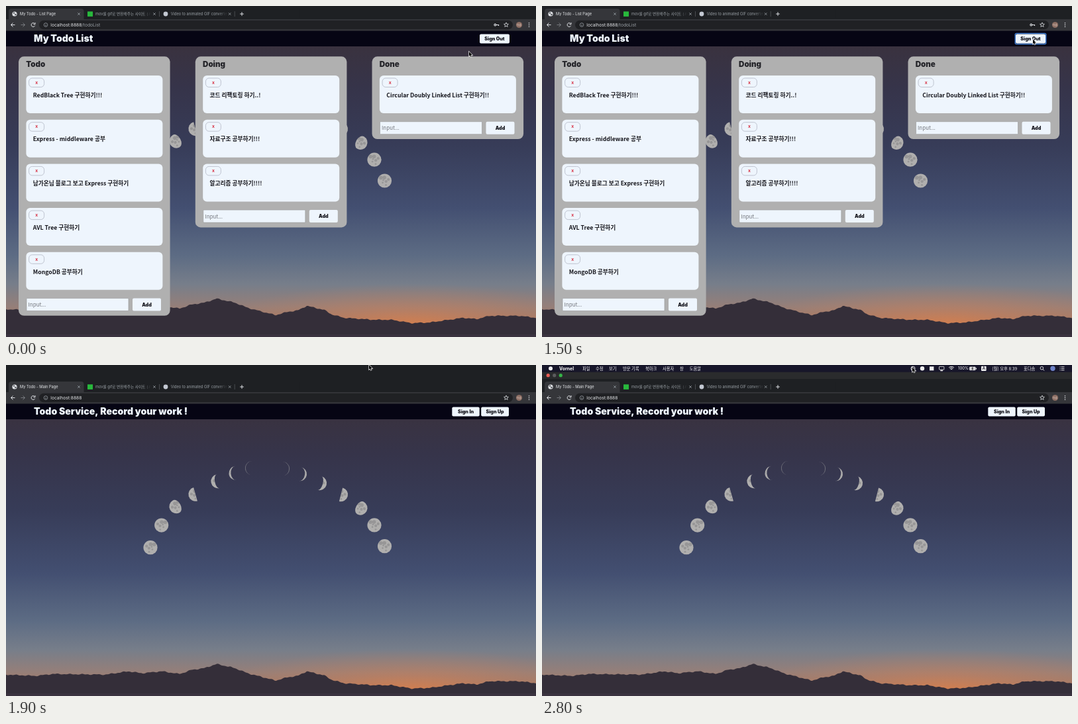
Animation of 800x500 px, one loop 2900 ms. Source, as an HTML page with a canvas:

```html
<!DOCTYPE html>
<html lang="ko">
<head>
<meta charset="utf-8">
<title>My Todo</title>
<style>
html, body { margin: 0; width: 100%; height: 100%; overflow: hidden; background: #1e2023; }
canvas { display: block; }
</style>
</head>
<body>
<canvas id="stage" width="800" height="500"></canvas>
<script>
const ctx = document.getElementById('stage').getContext('2d');
const LOOP = 2900, STEP = 100;
const PAGE_AT = 1600, SHIFT_AT = 1900, MENU_AT = 2000, FOCUS_AT = 1400;
const UI = 'Inter, "Noto Sans CJK KR", sans-serif';
const HAND = '"Noto Sans CJK KR", "Noto Sans CJK", sans-serif';
const PALE = '#eef5fd', ICON = '#dfe1e5', MUTED = '#9aa0a6';

const columns = [
  { x: 19, name: 'Todo', cards: ['RedBlack Tree 구현하기!!!', 'Express - middleware 공부',
    '남가온님 블로그 보고 Express 구현하기', 'AVL Tree 구현하기', 'MongoDB 공부하기'] },
  { x: 285.8, name: 'Doing', cards: ['코드 리팩토링 하기..!', '자료구조 공부하기!!!', '알고리즘 공부하기!!!!'] },
  { x: 552.5, name: 'Done', cards: ['Circular Doubly Linked List 구현하기!!'] }
];

// x, y, phase (1 full, 0 half, -1 new), tilt, opacity; lit on the left for the first half
const moons = [
  [218, 266, 1, 0, 1], [234.7, 232.4, 1, 0, 1], [257, 204, .65, -.5, 1], [286, 185.5, 0, -.28, 1],
  [320, 166, -.45, -.2, 1], [347, 153.7, -.72, -.1, .95], [371.5, 146, -.91, 0, .45],
  [571.5, 264, 1, 0, 1], [556, 232.2, 1, 0, 1], [535, 206.3, .65, .5, 1], [505.5, 186, 0, .25, 1],
  [473.5, 168.8, -.45, .28, 1], [443.5, 155, -.72, .15, .95], [417.5, 147, -.91, 0, .5]
];

const ridge = [[0, 458], [45, 460], [70, 457], [150, 458], [185, 453], [205, 456], [235, 453], [262, 457],
  [280, 451], [300, 448], [318, 442], [345, 448], [365, 456], [407, 467], [425, 462], [440, 460], [454, 453],
  [480, 459], [492, 466], [510, 471], [555, 474], [582, 474], [612, 479], [640, 478], [690, 471], [710, 473],
  [730, 468], [775, 468], [800, 471]];

// time, x, y of the pointer tip
const pointerPath = [[0, 699, 69], [300, 699, 69], [1000, 742, 53], [1300, 742, 53], [1500, 741, 50.5],
  [1600, 744, 52.5], [1800, 590, 1], [1900, 548, 0], [2100, 620, 0], [2300, 612, 3], [2700, 559, 3.5], [2900, 559, 3.5]];

function rect(x, y, w, h, fill, r = 0, stroke, line = 1) {
  ctx.beginPath();
  ctx.roundRect(x, y, w, h, r);
  if (fill) { ctx.fillStyle = fill; ctx.fill(); }
  if (stroke) { ctx.strokeStyle = stroke; ctx.lineWidth = line; ctx.stroke(); }
}

function dot(x, y, r, fill) {
  ctx.beginPath();
  ctx.arc(x, y, r, 0, 7);
  ctx.fillStyle = fill;
  ctx.fill();
}

function ring(x, y, r, color, from = 0, to = 7, width = 1) {
  ctx.beginPath();
  ctx.arc(x, y, r, from, to);
  ctx.strokeStyle = color;
  ctx.lineWidth = width;
  ctx.stroke();
}

function line(color, width, ...points) {
  ctx.beginPath();
  points.forEach(([x, y]) => ctx.lineTo(x, y));
  ctx.strokeStyle = color;
  ctx.lineWidth = width;
  ctx.stroke();
}

// y is the middle of the capitals
function text(s, x, y, size, color, weight = 400, family = UI, align = 'left') {
  ctx.font = `${weight} ${size}px ${family}`;
  ctx.textAlign = align;
  ctx.fillStyle = color;
  ctx.fillText(s, x, y + size * .36);
}

function button(label, x, y, w, h) {
  rect(x, y, w, h, PALE, 2);
  text(label, x + w / 2, y + h / 2, 7.1, '#15151c', 900, UI, 'center');
}

function gradient(g, stops) {
  stops.forEach(([at, color]) => g.addColorStop(at, color));
  return g;
}

function moon([x, y, phase, tilt, alpha], lit) {
  const r = 10.6;
  ctx.save();
  ctx.translate(x, y);
  ctx.rotate(tilt);
  ctx.scale(lit, 1);
  ctx.globalAlpha = alpha;
  ctx.beginPath();
  ctx.arc(0, 0, r, Math.PI / 2, Math.PI * 1.5);
  ctx.ellipse(0, 0, r * Math.abs(phase), r, 0, -Math.PI / 2, Math.PI / 2, phase < 0);
  ctx.fillStyle = '#b0afae';
  ctx.fill();
  ctx.clip();
  for (let i = 0; i < 7; i++) {
    const a = i * 2.4, d = 2 + i * .95;
    dot(Math.cos(a) * d, Math.sin(a) * d - 1, 1.4 + i % 3 * .7, 'rgba(112,112,116,.4)');
  }
  ctx.restore();
}

function scenery(top, shift) {
  ctx.save();
  ctx.beginPath();
  ctx.rect(0, top, 800, 500 - top);
  ctx.clip();
  ctx.translate(0, shift);
  ctx.fillStyle = gradient(ctx.createLinearGradient(0, 55, 0, 485), [[0, '#3a323e'], [.16, '#36344a'],
    [.36, '#373c58'], [.58, '#434f71'], [.75, '#5d6c84'], [.85, '#777e8a'], [.93, '#967f78'], [1, '#a9775e']]);
  ctx.fillRect(0, 40, 800, 460);
  ctx.save();
  ctx.translate(610, 485);
  ctx.scale(1, .22);
  ctx.fillStyle = gradient(ctx.createRadialGradient(0, 0, 0, 0, 0, 300),
    [[0, 'rgba(224,128,72,.85)'], [.4, 'rgba(205,128,88,.5)'], [1, 'rgba(190,130,100,0)']]);
  ctx.fillRect(-610, -320, 800, 400);
  ctx.restore();

  moons.forEach((m, i) => moon(m, i < 7 ? 1 : -1));

  ctx.beginPath();
  ctx.moveTo(0, 510);
  let k = 0;
  for (let x = 0; x <= 800; x += 2) {
    while (k < ridge.length - 2 && x > ridge[k + 1][0]) k++;
    const [x0, y0] = ridge[k], [x1, y1] = ridge[k + 1];
    const rough = Math.sin(x * .7) * .4 + Math.sin(x * .31) * .5;
    ctx.lineTo(x, y0 + (y1 - y0) * (x - x0) / (x1 - x0) + rough);
  }
  ctx.lineTo(800, 510);
  ctx.fillStyle = '#342e39';
  ctx.fill();
  ctx.restore();
  rect(0, 496, 800, 4, '#3a323f');
}

function column({ x, name, cards }) {
  const inputY = 105 + 66.7 * cards.length + 3;
  rect(x, 76.3, 228.6, inputY - 50, '#b0b0b0', 8);
  text(name, x + 11.2, 88, 11.6, '#25252a', 900);
  cards.forEach((label, i) => {
    const y = 105 + 66.7 * i;
    rect(x + 11.4, y, 206, 57, PALE, 6);
    rect(x + 15.6, y + 4, 23, 13.5, null, 5, '#b3b8c4', .8);
    text('x', x + 27.1, y + 10.2, 7, '#d8384a', 700, HAND, 'center');
    text(label, x + 21.8, y + 29.6, 8.7, '#16161c', 700, HAND);
  });
  rect(x + 12, inputY, 154, 19, PALE, 1, '#989898', .6);
  text('Input...', x + 14.5, inputY + 9.6, 8, '#74777d', 500, HAND);
  button('Add', x + 172, inputY, 43, 19);
}

function closeIcon(x) {
  line(MUTED, .8, [x - 1.8, 10.2], [x + 1.8, 13.8]);
  line(MUTED, .8, [x + 1.8, 10.2], [x - 1.8, 13.8]);
}

function backgroundTab(x, title) {
  text(title, x, 12, 5.7, MUTED);
  ctx.fillStyle = gradient(ctx.createLinearGradient(x + 72, 0, x + 84, 0), [[0, 'rgba(30,32,35,0)'], [1, '#1e2023']]);
  ctx.fillRect(x + 72, 5, 12, 14);
  rect(x + 84, 5, 110, 14, '#1e2023');
  closeIcon(x + 89);
  line('#55585c', .8, [x + 96.5, 8], [x + 96.5, 16]);
}

function star(x, y) {
  const points = Array.from({ length: 11 }, (_, i) => {
    const a = i * Math.PI / 5 - Math.PI / 2, r = i % 2 ? 1.6 : 3.6;
    return [x + Math.cos(a) * r, y + Math.sin(a) * r];
  });
  line(ICON, .8, ...points);
}

function browser(listPage) {
  rect(0, 0, 800, 20, '#1e2023');
  rect(4, 4, 113.5, 20, '#35363a', 4);
  rect(0, 20, 800, 18, '#35363a');
  dot(13, 12, 3.6, ICON);
  dot(12, 10.6, 1.2, '#55585c');
  dot(14.4, 13, 1.3, '#55585c');
  text(listPage ? 'My Todo - List Page' : 'My Todo - Main Page', 21, 12, 5.7, '#e8eaed');
  closeIcon(110);
  backgroundTab(135, 'mov를 gif로 변환해주는 사이트 (.mov to .gif)');
  rect(123, 8.3, 8, 7.6, '#28b83c');
  backgroundTab(248.7, 'Video to animated GIF converter');
  dot(241, 12, 3.4, '#c3c8d2');
  line(ICON, 1, [353.2, 12], [358.8, 12]);
  line(ICON, 1, [356, 9.2], [356, 14.8]);

  for (const [x, dir, color] of [[10.5, 1, ICON], [25.5, -1, '#787b80']]) {
    line(color, 1, [x - 3 * dir, 28.5], [x + 3 * dir, 28.5]);
    line(color, 1, [x, 25.5], [x - 3 * dir, 28.5], [x, 31.5]);
  }
  ring(41, 28.5, 2.9, ICON, .4, 5.5);
  line(ICON, 1, [44, 25], [44, 27.6], [41.5, 27.6]);
  rect(50, 21.7, 715, 13.6, '#202124', 6.8);
  ring(60, 28.5, 2.8, MUTED, 0, 7, .8);
  line(MUTED, .9, [60, 28.2], [60, 30.2]);
  text('localhost:8888', 67.3, 28.5, 6.7, '#e8eaed');
  if (listPage) {
    text('/todoList', 67.3 + ctx.measureText('localhost:8888').width, 28.5, 6.7, MUTED);
    ring(738.3, 28.5, 1.4, ICON, 0, 7, 1.1);
    line(ICON, 1.2, [740, 28.5], [743.5, 28.5], [743.5, 30]);
  }
  star(755, 28.5);
  dot(774.5, 28.5, 4.6, '#8d6e63');
  text('다솜', 774.5, 28.5, 3.6, '#f2e4df', 400, HAND, 'center');
  [-2.7, 0, 2.7].forEach(d => dot(789.5, 28.5 + d, .8, ICON));

  rect(0, 37.5, 800, 23.5, '#060514');
  text(listPage ? 'My Todo List' : 'Todo Service, Record your work !', 42, 48.7, 14.05, '#f0f8ff', 900);
}

function menuBar() {
  rect(0, 0, 800, 10.7, '#17162a');
  rect(0, 10.7, 800, 10.3, '#2a2b2d');
  ['#ec5f56', '#5b5c5e', '#35b548'].forEach((c, i) => dot(9.2 + 9.5 * i, 15.7, 2.6, c));
  dot(13, 5.2, 3, '#f1f1f4');
  text('Vornel', 26, 5.3, 6.9, '#fff', 700);
  const items = [[61, '파일'], [81, '수정'], [101, '보기'], [122, '방문 기록'], [156, '북마크'],
    [182, '사용자'], [208, '창'], [222.7, '도움말'], [727, '표다솜']];
  items.forEach(([x, s]) => text(s, x, 5.3, 6.3, '#f4f4f6', 500, HAND));

  ring(560, 5.3, 3.1, '#eee', 0, 7, .9);
  rect(558.8, 4.1, 2.4, 2.4, '#eee');
  dot(574, 5.3, 3.2, '#eee');
  rect(585, 2.3, 6.4, 6, '#eee');
  rect(599.5, 2.4, 7.4, 4.6, null, .5, '#eee', .8);
  line('#eee', 1.6, [601.3, 8.4], [605.1, 8.4]);
  [1.8, 3.8, 5.8].forEach(r => ring(618, 8.2, r, '#eee', -2.3, -.84, 1));
  text('100%', 628, 5.3, 6, '#f4f4f6');
  rect(645.3, 2.9, 9, 4.9, '#d8d8dc', 1, '#eee', .6);
  rect(655, 4.4, 1, 2, '#eee');
  line('#222', .9, [650.6, 2.8], [648.8, 5.4], [650.8, 5.4], [649, 8]);
  rect(663, 1.7, 7.6, 7.4, '#eee', 1);
  text('A', 666.8, 5.4, 5.8, '#17162a', 600, UI, 'center');
  text('(월) 오후 8:39', 679.3, 5.3, 6.5, '#f4f4f6', 500, HAND);
  ring(754.4, 4.7, 2.3, '#eee', 0, 7, .9);
  line('#eee', 1, [756, 6.4], [758, 8.5]);
  dot(771, 5.3, 3.7, '#6d82c8');
  [2.8, 5.3, 7.8].forEach(y => {
    line('#eee', .9, [781.5, y], [782.5, y]);
    line('#eee', .9, [783.6, y], [788.5, y]);
  });
}

function pointer(t) {
  const i = pointerPath.findIndex(p => p[0] > t);
  const [t0, x0, y0] = pointerPath[i - 1], [t1, x1, y1] = pointerPath[i];
  const u = (t - t0) / (t1 - t0), e = u * u * (3 - 2 * u);
  ctx.save();
  ctx.translate(x0 + (x1 - x0) * e, y0 + (y1 - y0) * e);
  ctx.beginPath();
  [[0, 0], [0, 6.8], [1.5, 5.4], [2.6, 7.9], [3.7, 7.4], [2.7, 5], [4.8, 5]].forEach(([x, y]) => ctx.lineTo(x, y));
  ctx.closePath();
  ctx.strokeStyle = '#fff';
  ctx.lineWidth = 1.3;
  ctx.stroke();
  ctx.fillStyle = '#000';
  ctx.fill();
  ctx.restore();
}

function draw(t) {
  const listPage = t < PAGE_AT, drop = t < SHIFT_AT ? 0 : 21;
  rect(0, 0, 800, 500, '#1e2023');
  scenery(60 + drop, drop ? 9.7 : 0);
  ctx.save();
  ctx.translate(0, drop);
  browser(listPage);
  if (listPage) {
    columns.forEach(column);
    if (t >= FOCUS_AT) rect(714.2, 41.5, 46.6, 16, null, 2, '#3f7fd8', 1.4);
    button('Sign Out', 715, 42.5, 45, 14);
  } else {
    button('Sign In', 673.3, 42.5, 41.4, 14);
    button('Sign Up', 717.2, 42.5, 41.8, 14);
  }
  ctx.restore();
  if (t >= MENU_AT) menuBar();
  pointer(t);
}

function tick() {
  draw(Math.floor(performance.now() % LOOP / STEP) * STEP);
  requestAnimationFrame(tick);
}
tick();
</script>
</body>
</html>
```
